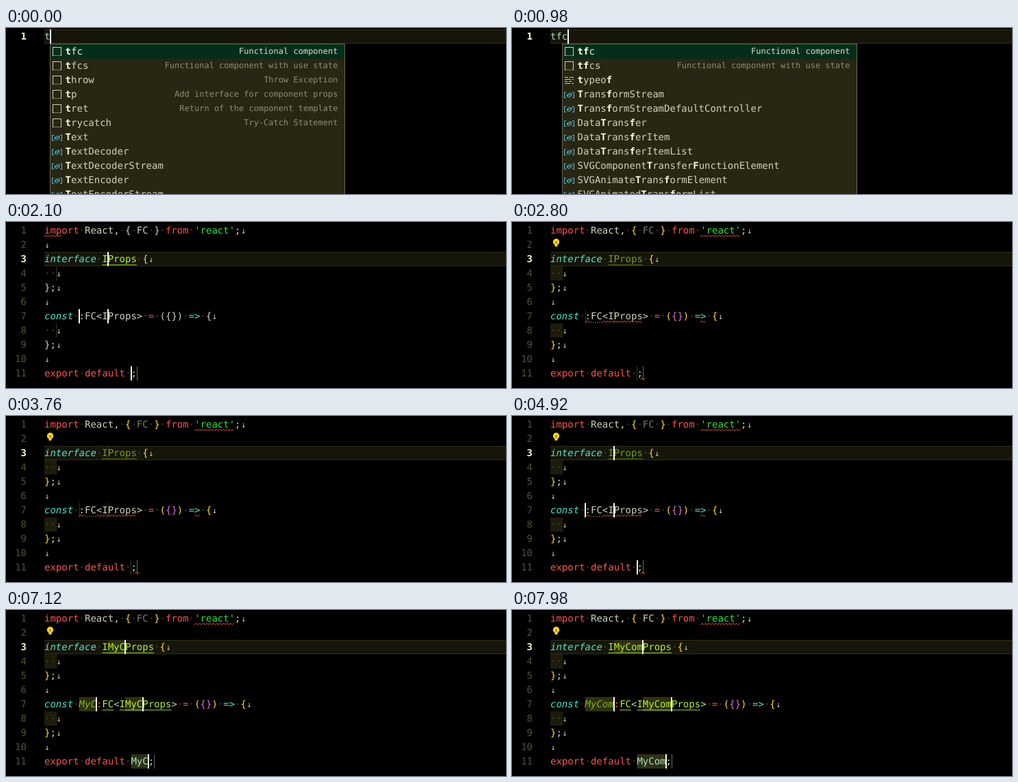
Write an HTML page that moves like this. It is 730 px wide and 244 px high and loops after 8 s.

```html
<!DOCTYPE html>
<html lang="en">
<head>
<meta charset="utf-8">
<title>Component snippet</title>
<style>
  html, body { margin: 0; width: 100%; height: 100%; overflow: hidden; background: #000; }
  svg { display: block; width: 730px; height: 244px; }
  text { font: 14px "DejaVu Sans Mono", monospace; text-rendering: geometricPrecision; white-space: pre; }
  .red { fill: #ff5248; }
  .pale { fill: #c5d4b4; }
  .str { fill: #2be33c; }
  .key { fill: #44e8cc; font-style: italic; }
  .op { fill: #44e8cc; }
  .lime { fill: #aef02c; }
  .dimlime { fill: #6f9c1c; }
  .name { fill: #82b41e; font-style: italic; }
  .ref { fill: #a4e2c4; }
  .dim { fill: #747e64; }
  .gold { fill: #ffd728; }
  .pink { fill: #d670d4; }
  .word { fill: #a3d8bc; }
  .dot { fill: #48462a; }
  .eol { fill: #cccba8; font-size: 12px; }
  .num { fill: #515034; text-anchor: end; }
  .num.on { fill: #f8f8cc; font-weight: bold; }
  .item { fill: #d2d2bc; }
  .item.sel { fill: #f2f2e2; }
  .item tspan { fill: #fcfce0; font-weight: bold; }
  .detail { font-size: 12px; fill: #8e8d74; text-anchor: end; }
  .detail.sel { fill: #dcdfd0; }
  .caret { fill: #fcfce4; }
</style>
</head>
<body>
<svg id="stage" viewBox="0 0 730 244"></svg>
<script>
const LOOP = 8000, LEFT = 56, CHAR = 8.428, ROW = 21;
const INSERTED = 1850, ANALYSED = 2800, RESOLVED = 6150, IMPORT_USED = 7500, LIST_LAG = 60;
const KEYS = [
  [-100, 't'], [450, 'tf'], [950, 'tfc'],
  [INSERTED, ''], [5600, 'M'], [6250, 'My'], [6750, 'MyC'], [7300, 'MyCo'], [7750, 'MyCom']
];
const LISTS = {
  t: ['s|^tfc|Functional component', 's|^tfcs|Functional component with use state', 's|^throw|Throw Exception',
    's|^tp|Add interface for component props', 's|^tret|Return of the component template',
    's|^trycatch|Try-Catch Statement', 'v|^Text', 'v|^TextDecoder', 'v|^TextDecoderStream',
    'v|^TextEncoder', 'v|^TextEncoderStream'],
  tf: ['s|^t^fc|Functional component', 's|^t^fcs|Functional component with use state', 'k|^typeo^f',
    'v|^Trans^formStream', 'v|^Trans^formStreamDefaultController', 'v|Data^Trans^fer',
    'v|Data^Trans^ferItem', 'v|Data^Trans^ferItemList', 'v|SVGComponent^Transfer^FunctionElement',
    'v|SVGAnimate^Trans^formElement', 'v|SVGAnimated^Trans^formList'],
  tfc: ['s|^t^f^c|Functional component', 's|^t^f^cs|Functional component with use state',
    'v|^Trans^formStreamDefault^Controller', 'v|SVGComponent^Transfer^Fun^ctionElement',
    'v|WebGL^Transform^Feedba^ck', 'v|RTCD^TM^FTone^ChangeEvent']
};

const stage = document.getElementById('stage');
const esc = s => s.replace(/</g, '&lt;').replace(/>/g, '&gt;');
const colX = col => LEFT + col * CHAR;
const lineY = line => 2 + (line - 1) * ROW;
const text = (x, y, cls, s) => `<text x="${x.toFixed(2)}" y="${y}" class="${cls}">${s}</text>`;
const rect = (x, y, w, h, fill) => `<rect x="${x}" y="${y}" width="${w}" height="${h}" fill="${fill}"/>`;

// Takes class and text in turn; blanks become visible dots.
function code(line, ...runs) {
  const y = lineY(line) + 15;
  let col = 0, out = '';
  for (let i = 0; i < runs.length; i += 2) {
    for (const part of runs[i + 1].match(/ |[^ ]+/g) || []) {
      out += part === ' ' ? text(colX(col), y, 'dot', '·') : text(colX(col), y, runs[i], esc(part));
      col += part.length;
    }
  }
  return { out, end: text(colX(col) + .6, y - .5, 'eol', '↓') };
}

function codeLine(line, ...runs) {
  const { out, end } = code(line, ...runs);
  return out + end;
}

const lineNumber = (line, on) => text(30, lineY(line) + 15, on ? 'num on' : 'num', line);

const currentLine = line =>
  rect(LEFT, lineY(line), 674, ROW, '#16150a') +
  rect(LEFT, lineY(line), 674, 1, '#2f2d16') + rect(LEFT, lineY(line) + ROW - 1, 674, 1, '#2f2d16');

const caret = (line, col) =>
  `<rect class="caret" x="${Math.round(colX(col) - .6)}" y="${lineY(line)}" width="2" height="${ROW}"/>`;

const mark = (line, col, len) => len
  ? rect(colX(col), lineY(line), len * CHAR, ROW, '#2e3014')
  : rect(Math.round(colX(col)), lineY(line), 1, ROW, '#38361a');

const underline = (line, col, len, color) =>
  rect(colX(col), lineY(line) + 18.5, len * CHAR, 1, color);

function squiggle(line, col, len) {
  const y = lineY(line) + 19.5, end = colX(col + len);
  let d = '';
  for (let x = colX(col), i = 0; x <= end; x += 2.5, i++) d += `${i ? 'L' : 'M'}${x.toFixed(1)} ${y - (i % 2 ? 2 : 0)}`;
  return `<path d="${d}" fill="none" stroke="#f0502c"/>`;
}

const bulb = () => '<circle cx="64.5" cy="29.3" r="4.7" fill="#ffd02a"/>' +
  rect(62.5, 32.5, 4, 3.5, '#ffd02a') + rect(63.5, 28, 2, 4, '#a87a08');

function icon(kind, x, y) {
  if (kind === 's') return `<rect x="${x + .5}" y="${y - 6.5}" width="12" height="12" fill="none" stroke="#cfcfb4"/>` +
    `<path d="M${x + 2} ${y + 5.5}h10" stroke="#272616" stroke-dasharray="1 1"/>`;
  if (kind === 'k') return `<path d="M${x} ${y - 4.5}h5m2 0h6M${x} ${y - 1.5}h9m2 0h2M${x} ${y + 1.5}h4m2 0h4M${x} ${y + 4.5}h8m2 0h3" stroke="#cfcfb4"/>`;
  return `<g fill="none" stroke="#55bede"><path d="M${x + 2} ${y - 3.5}h-2.5v8h2.5M${x + 11} ${y - 3.5}h2.5v8h-2.5"/>` +
    `<path d="M${x + 3.5} ${y}l4 -2.5 2.5 1v3l-4 2 -2.5 -1zl2.5 1 4 -2.5"/></g>`;
}

function suggestions(word) {
  const items = LISTS[word], x = Math.round(colX(word.length)), height = items.length * ROW;
  let out = `<rect x="${x + .5}" y="23.5" width="430" height="${height + 1}" fill="#282714" stroke="#6c6944"/>` +
    rect(x + 1, 24, 429, ROW, '#022e1a');
  items.forEach((item, i) => {
    const [kind, label, detail] = item.split('|'), mid = 34 + i * ROW, sel = i ? '' : ' sel';
    out += icon(kind, x + 4, mid + 1) +
      text(x + 22.6, mid + 5, 'item' + sel, label.replace(/\^(.)/g, '<tspan>$1</tspan>'));
    if (detail) out += text(x + 420.5, mid + 4, 'detail' + sel, detail);
  });
  return out;
}

function typingView(s) {
  return currentLine(1) + lineNumber(1, true) + text(LEFT, 17, 'word', s.word) +
    suggestions(s.list) + (s.lit ? caret(1, s.word.length) : '');
}

function componentView({ word, lit, analysed, resolved, used }) {
  const n = word.length, props = `I${word}Props`;
  const outer = analysed ? 'gold' : 'pale', inner = analysed ? 'pink' : 'pale';
  const typeCls = n ? 'lime' : 'pale';
  const propsCls = analysed && !resolved ? 'dimlime' : 'lime';
  const lineColor = propsCls === 'lime' ? '#a0dc2c' : '#5c8210';
  const generic = 10 + n, arrow = 2 * n + 26;
  const slots = [[3, 11], [7, 6], [7, generic + 1], [11, 15]];

  let out = currentLine(3);
  for (let i = 1; i <= 11; i++) out += lineNumber(i, i === 3);
  for (const line of [4, 8]) out += analysed
    ? rect(LEFT, lineY(line), 18.5, ROW, '#1d1b0a')
    : rect(73, lineY(line), 1, ROW, '#38361a');
  for (const [line, col] of slots) out += mark(line, col, n);

  out += codeLine(1, 'red', 'import', 'pale', ' React, ', outer, '{', analysed && !used ? 'dim' : 'pale', ' FC ',
    outer, '}', 'red', ' from ', 'str', "'react'", 'pale', ';');
  out += analysed ? bulb() : codeLine(2);
  out += codeLine(3, 'key', 'interface ', propsCls, props, outer, ' {');
  out += codeLine(4, 'dot', '  ') + codeLine(5, outer, '}', 'pale', ';') + codeLine(6);
  out += codeLine(7, 'key', 'const ', 'name', word, n ? 'red' : 'pale', ':', typeCls, 'FC', 'pale', '<', typeCls, props,
    'pale', '>', 'red', ' = ', outer, '(', inner, '{}', outer, ')', 'op', ' => ', outer, '{');
  out += codeLine(8, 'dot', '  ') + codeLine(9, outer, '}', 'pale', ';') + codeLine(10);
  out += code(11, 'red', 'export default ', 'ref', word, 'pale', ';').out;

  out += underline(3, 10, props.length, lineColor);
  out += analysed ? squiggle(1, 26, 7) : squiggle(1, 0, 3);
  if (resolved) {
    out += underline(7, 7 + n, 2, '#a0dc2c') + underline(7, generic, props.length, '#a0dc2c');
  } else if (analysed) {
    out += squiggle(7, 6 + n, 1) + squiggle(7, generic - (n ? 0 : 1), props.length + (n ? 0 : 1)) +
      squiggle(7, arrow, 1) + squiggle(11, 15.6 + n, 1);
    out += n ? underline(7, 7 + n, 2, '#a0dc2c')
      : `<path d="M${colX(7)} ${lineY(7) + 19.5}h17" stroke="#b0b080" stroke-dasharray="1 2"/>`;
  }
  out += rect(Math.round(colX(16 + n)), lineY(11), 1, ROW, '#686868');
  if (lit) for (const [line, col] of slots) out += caret(line, col + n);
  return out;
}

const lastKey = t => KEYS.filter(([at]) => at <= t).pop();

function stateAt(t) {
  const [at, word] = lastKey(t);
  return {
    word,
    lit: (t - at) % 1000 < 500,
    typing: t < INSERTED,
    list: t < INSERTED ? lastKey(t - LIST_LAG)[1] : '',
    analysed: t >= ANALYSED,
    resolved: t >= RESOLVED,
    used: t >= IMPORT_USED
  };
}

let shown = '';
const startTime = performance.now();
function draw() {
  const state = stateAt((performance.now() - startTime) % LOOP), key = JSON.stringify(state);
  if (key !== shown) {
    shown = key;
    stage.innerHTML = state.typing ? typingView(state) : componentView(state);
  }
  requestAnimationFrame(draw);
}
draw();
</script>
</body>
</html>
```
